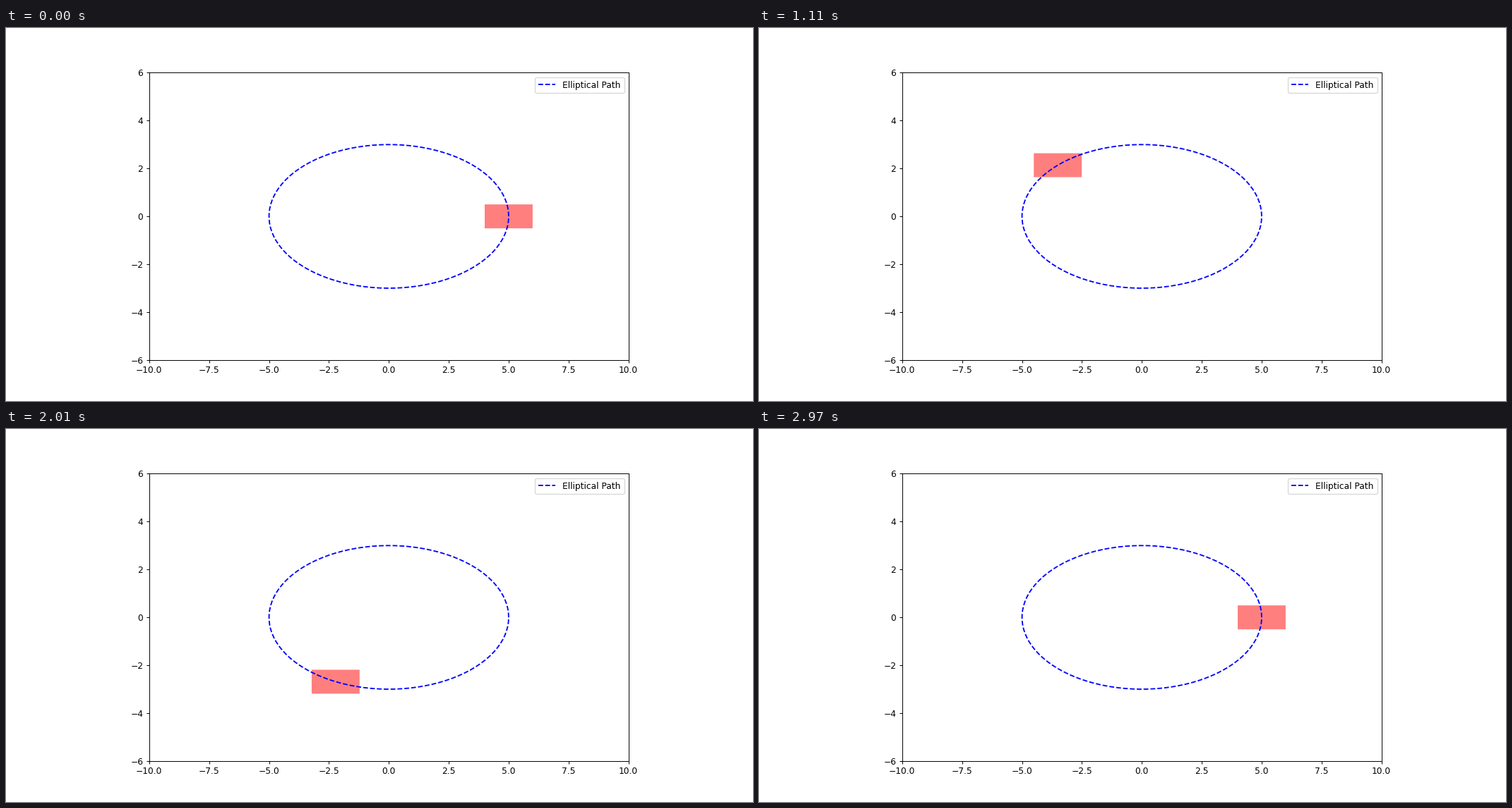
These frames come from a looping animation (1058 px wide and 529 px high, 3 s). A matplotlib script:

```python
import numpy as np
import matplotlib.pyplot as plt
from matplotlib.animation import FuncAnimation
from matplotlib.patches import Rectangle

STAGE_W = 1058
FIG_W, FIG_H = 12, 6  # inches
DPI = (STAGE_W + 1e-6) / FIG_W  # tiny margin against float rounding
FRAMES, INTERVAL = 100, 30
A, B = 5, 3  # ellipse half axes
BOX_W, BOX_H = 2, 1

fig, ax = plt.subplots(figsize=(FIG_W, FIG_H), dpi=DPI)
ax.set_xlim(-10, 10)
ax.set_ylim(-6, 6)
ax.set_aspect("equal")

theta = np.linspace(0, 2 * np.pi, FRAMES)
ax.plot(A * np.cos(theta), B * np.sin(theta), "b--", label="Elliptical Path")
ax.legend(loc="upper right")

# Unsnapped edges let the box glide between whole pixels.
box = Rectangle((A - BOX_W / 2, -BOX_H / 2), BOX_W, BOX_H,
                facecolor="red", edgecolor="none", alpha=0.5, snap=False)
ax.add_patch(box)


def update(i):
    angle = 2 * np.pi * i / (FRAMES - 1)
    box.set_xy((A * np.cos(angle) - BOX_W / 2, B * np.sin(angle) - BOX_H / 2))
    return (box,)


anim = FuncAnimation(fig, update, frames=FRAMES, interval=INTERVAL,
                     repeat=True, repeat_delay=0, blit=False)

plt.show()
```
